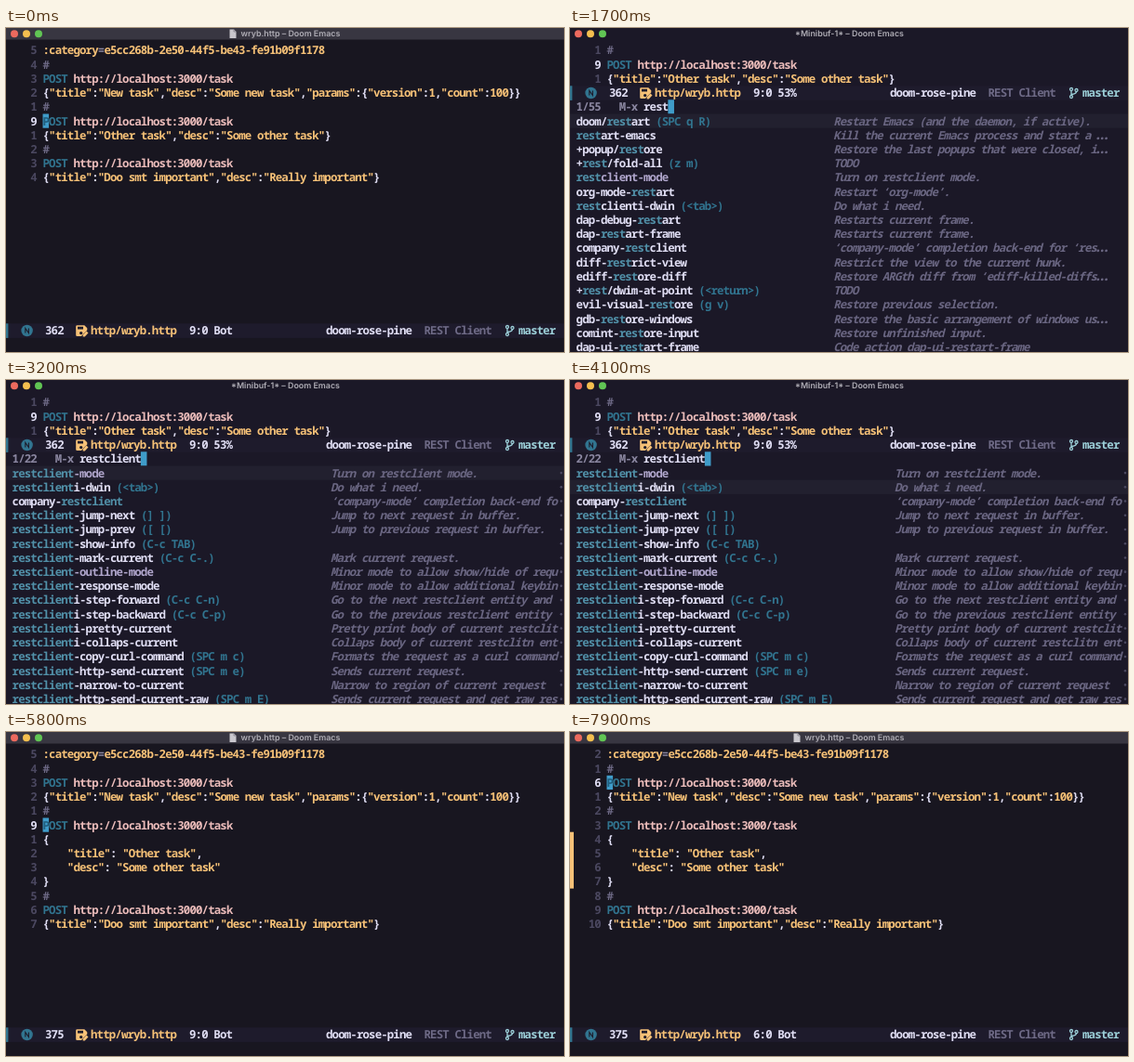
An HTML page for the animation above (8 s loop, 600 by 349 pixels).

```html
<!DOCTYPE html>
<html lang="en">
<head>
<meta charset="utf-8">
<title>Doom Emacs</title>
<style>
  html, body { margin: 0; height: 100%; overflow: hidden; background: #181620; }
  svg { display: block; width: 100vw; height: 100vh; }
  text {
    font: 600 12.4px "Noto Sans Mono", "DejaVu Sans Mono", monospace;
    letter-spacing: -0.855px;
    white-space: pre;
    text-rendering: geometricPrecision;
    fill: #e0def4;
  }
  .gold { fill: #f6c177; }
  .rose { fill: #ebbcba; }
  .pine { fill: #31748f; }
  .match { fill: #5190a8; }
  .foam { fill: #9ccfd8; }
  .muted { fill: #6e6a86; }
  .subtle { fill: #8a86a0; }
  .dim { fill: #4b4860; }
  .mode { fill: #afa5cb; }
  .note { fill: #6a6682; font-style: italic; }
  .under { fill: #205d7c; }
  .key { fill: #add8e6; }
  .b { font-weight: 700; }
  .dots { font: italic 600 16px "Noto Sans", sans-serif; letter-spacing: 0; }
  .title {
    font: 600 8.9px Inter, "Open Sans", sans-serif;
    letter-spacing: 0;
    text-anchor: middle;
    fill: #b0aeb6;
  }
</style>
</head>
<body>
<svg id="stage" viewBox="0 0 600 349" preserveAspectRatio="none"></svg>
<script>
const LOOP = 8000, CELL = 6.585, LINE = 15.22, LEFT = 6.6, TOP = 16.4;
const EDITOR_BG = '#181620', PALETTE_BG = '#1b1827';
const stage = document.getElementById('stage');

const colX = c => LEFT + c * CELL;
const rowY = r => TOP + r * LINE;
const esc = s => s.replace(/&/g, '&amp;').replace(/</g, '&lt;');
const text = (x, y, cls, s) =>
  `<text x="${x.toFixed(2)}" y="${y.toFixed(2)}" class="${cls}">${esc(s)}</text>`;
const rect = (x, y, w, h, fill) =>
  `<rect x="${x}" y="${y}" width="${w}" height="${h}" fill="${fill}"/>`;

// Puts [class, string] pieces one after another on the character grid.
function line(row, col, parts) {
  let out = '';
  for (const [cls, s] of parts) {
    if (s.trim()) out += text(colX(col), rowY(row) + 12, cls, s);
    col += s.length;
  }
  return out;
}

// ---- Buffer ----
const post = 'POST http://localhost:3000/task';
const head = [
  ':category=e5cc268b-2e50-44f5-be43-fe91b09f1178', '#', post,
  '{"title":"New task","desc":"Some new task","params":{"version":1,"count":100}}',
  '#', post
];
const tail = ['#', post, '{"title":"Doo smt important","desc":"Really important"}'];
const flat = [...head, '{"title":"Other task","desc":"Some other task"}', ...tail];
const pretty = [...head, '{', '    "title": "Other task",', '    "desc": "Some other task"', '}', ...tail];

function paint(s) {
  if (s === '#') return [['muted', s]];
  if (s[0] === ':') return [['gold b', s.slice(0, 9)], ['subtle', '='], ['gold', s.slice(10)]];
  if (s.startsWith('POST')) return [['pine b', 'POST'], ['rose', s.slice(4)]];
  return s.split(/("[^"]*"|\d+)/).map((p, i) => [i % 2 ? 'gold' : '', p]);
}

function buffer(lines, cur, from = 0, to = lines.length, block = true) {
  let out = '';
  for (let i = from; i < to; i++) {
    const here = i === cur, row = i - from;
    const num = String(here ? cur + 4 : Math.abs(i - cur));
    out += line(row, 4 - num.length, [[here ? '' : 'dim', num]]);
    out += line(row, 5, paint(lines[i]));
    if (here && block) {
      out += rect(colX(5), rowY(row), CELL, LINE, '#3f9cc9') + line(row, 5, [['under b', lines[i][0]]]);
    }
  }
  return out;
}

// ---- Window furniture ----
function titleBar(name, main) {
  const lights = ['#ec6a5e', '#f5bf4f', '#61c554']
    .map((c, i) => `<circle cx="${9 + 13 * i}" cy="6.2" r="4" fill="${c}"/>`).join('');
  const strip = main
    ? rect(0, 0, 600, 12.5, '#383641') +
      '<path d="M240.5 1.5h4.5l2.5 2.5v7h-7z" fill="#c9c7cd"/>' +
      '<path d="M245 1.5v2.5h2.5" fill="none" stroke="#77757e" stroke-width=".7"/>'
    : '';
  return strip + lights + text(main ? 306 : 300.5, 9.4, 'title', name + ' – Doom Emacs');
}

function modeLine(y, size, pos) {
  const put = (x, cls, s) => text(x, 4.4, cls, s);
  return `<g transform="translate(0 ${y})">` +
    rect(0, -7.7, 600, 15.6, '#1e1b2c') + rect(0, -7.7, 2.4, 15.6, '#31748f') +
    '<circle cx="22.6" cy="0" r="6.2" fill="#31748f"/>' +
    '<path d="M20.8 2.6v-5.2l3.6 5.2v-5.2" fill="none" stroke="#1d1b2a" stroke-width="1.1"/>' +
    put(42, '', size) +
    '<path d="M76.5-5.8h7.8l3 3v2.2l-6 6v.6h-4.8q-1.3 0-1.3-1.3v-9.2q0-1.3 1.3-1.3z" fill="#f6c177"/>' +
    '<path d="M77-4.2h6v2.6h-6zM79 2.6a1.7 1.7 0 1 1 3.4 0a1.7 1.7 0 1 1-3.4 0" fill="#1d1b2a"/>' +
    '<path d="M82.7 6.4v-2l3.8-3.8 2 2-3.8 3.8z" fill="#f6c177"/>' +
    put(91, 'gold b', 'http/wryb.http') + put(197, '', pos) +
    put(344, '', 'doom-rose-pine') + put(449.5, 'muted b', 'REST Client') +
    '<g fill="none" stroke="#9ccfd8" stroke-width="1.3"><path d="M539-2.5v5M544.5-1.5q0 2.5-5.5 3"/>' +
    '<circle cx="539" cy="-4" r="1.5"/><circle cx="539" cy="4" r="1.5"/><circle cx="544.5" cy="-3" r="1.5"/></g>' +
    put(551, 'foam b', 'master') + '</g>';
}

// ---- Completion lists: name|key|description, * marks an active mode ----
const parse = s => s.trim().split('\n').map(r => r.split('|'));

const allCommands = parse(`
my/set-transparent||Change current percentage of transparency.
scalai-sep-args||Transefer current def args to seporate line…
projectile-replace||Replace literal string in project using non…
regexp-builder||Construct a regexp interactively.
jira-from-org-kill||Convert org to jira format.
stevia-open-change-log-today||Open change log file by today’s date.
forge-browse||Visit the thing at point using a browser.
+magit/start-code-review||
magit-ediff-compare||Compare REVA:FILEA with REVB:FILEB using Ed…
eshell||Create an interactive Eshell buffer.
toggle-truncate-lines|C-x x t|Toggle truncating of long lines for the cur…
scratch-buffer||Switch to the *scratch* buffer.
+scala/open-repl||Open a scala repl. Uses ‘run-scala’ if in a…
scalai-concat-imports-region||Concat separeded imports to one in region.
dabbrev-completion|M-/|Completion on current word.
dabbrev-expand||Expand previous word "dynamically".
company-manual-begin||Start the completion interface.`);

const restCommands = parse(`
doom/restart|SPC q R|Restart Emacs (and the daemon, if active).
restart-emacs||Kill the current Emacs process and start a …
+popup/restore||Restore the last popups that were closed, i…
+rest/fold-all|z m|TODO
*restclient-mode||Turn on restclient mode.
org-mode-restart||Restart ‘org-mode’.
restclienti-dwin|<tab>|Do what i need.
dap-debug-restart||Restarts current frame.
dap-restart-frame||Restarts current frame.
company-restclient||‘company-mode’ completion back-end for ‘res…
diff-restrict-view||Restrict the view to the current hunk.
ediff-restore-diff||Restore ARGth diff from ‘ediff-killed-diffs…
+rest/dwim-at-point|<return>|TODO
evil-visual-restore|g v|Restore previous selection.
gdb-restore-windows||Restore the basic arrangement of windows us…
comint-restore-input||Restore unfinished input.
dap-ui-restart-frame||Code action dap-ui-restart-frame`);

const clientCommands = parse(`
*restclient-mode||Turn on restclient mode.
restclienti-dwin|<tab>|Do what i need.
company-restclient||‘company-mode’ completion back-end fo
restclient-jump-next|] ]|Jump to next request in buffer.
restclient-jump-prev|[ [|Jump to previous request in buffer.
restclient-show-info|C-c TAB|
restclient-mark-current|C-c C-.|Mark current request.
*restclient-outline-mode||Minor mode to allow show/hide of requ
restclient-response-mode||Minor mode to allow additional keybin
restclienti-step-forward|C-c C-n|Go to the next restclient entity and
restclienti-step-backward|C-c C-p|Go to the previous restclient entity
restclienti-pretty-current||Pretty print body of current restclit
restclienti-collaps-current||Collaps body of current restclitn ent
restclient-copy-curl-command|SPC m c|Formats the request as a curl command
restclient-http-send-current|SPC m e|Sends current request.
restclient-narrow-to-current||Narrow to region of current request
restclient-http-send-current-raw|SPC m E|Sends current request and get raw res`);

function candidate([raw, key, note], row, query, wide) {
  const active = raw[0] === '*', name = active ? raw.slice(1) : raw;
  const base = active ? 'mode b' : '';
  const at = query.length > 1 ? name.indexOf(query) : -1;
  const end = at + query.length;
  const parts = at < 0 ? [[base, name]]
    : [[base, name.slice(0, at)], ['match', query], [base, name.slice(end)]];
  if (key) parts.push(['pine', ` (${key})`]);
  const cut = note.endsWith('…'), body = cut ? note.slice(0, -1) : note;
  const overflow = wide ? `<circle cx="597" cy="${rowY(row) + LINE / 2}" r="1.3" fill="#4b4860"/>` : '';
  return line(row, 0, parts) + overflow +
    line(row, wide ? 52 : 42, [['note', body], ['note dots', cut ? '…' : '']]);
}

function palette(query, pick) {
  const n = query.length;
  const list = n < 2 ? allCommands : n < 5 ? restCommands : clientCommands;
  const total = n < 2 ? 10345 : n === 2 ? 1204 : n === 3 ? 231 : n === 4 ? 55 : 22;
  const prompt = `${pick + 1}/${total}`.padEnd(6) + ' M-x ';
  return rect(0, 0, 600, 349, PALETTE_BG) +
    titleBar('*Minibuf-1*', false) +
    buffer(flat, 5, 4, 7, false) +
    modeLine(70, '362', '9:0 53%') +
    line(4, 0, [['subtle', prompt], ['', query]]) +
    rect(colX(prompt.length + n), rowY(4), CELL, LINE, '#3f9cc9') +
    rect(0, rowY(5 + pick), 600, LINE, '#22202f') +
    list.map((c, i) => candidate(c, 5 + i, query, n > 4)).join('');
}

function echo() {
  const msg = 'You can run the command ‘restclienti-dwin’ with ', x = colX(msg.length);
  return text(LEFT, 346, '', msg) +
    `<rect x="${x - 0.5}" y="334.5" width="${CELL * 5 + 1}" height="14" fill="#303030" stroke="#595959"/>` +
    text(x, 346, 'key', '<tab>');
}

function editor(done, cur, message, gutter) {
  return rect(0, 0, 600, 349, EDITOR_BG) +
    titleBar('wryb.http', true) +
    buffer(done ? pretty : flat, cur) +
    (gutter ? rect(0, rowY(6), 4, LINE * 4, '#f6c177') : '') +
    modeLine(326, done ? '375' : '362', `${cur + 4}:0 Bot`) +
    (message ? echo() : '');
}

// ---- Timeline ----
const OPEN = 600, ENTER = 4400;
const keyTimes = [1200, 1400, 1500, 1600, 2200, 2300, 2400, 2500, 2600, 2700];
const moves = [7200, 7500, 7800];
const passed = (times, t) => times.filter(at => t >= at).length;

function scene(t) {
  if (t >= OPEN && t < ENTER) {
    return [palette, 'restclient'.slice(0, passed(keyTimes, t)), t >= 3700 ? 1 : 0];
  }
  return [editor, t >= ENTER, 5 - passed(moves, t), t >= 4500 && t < 5600, t >= 6400];
}

let shown = '';
function frame() {
  const [draw, ...args] = scene(performance.now() % LOOP);
  const id = draw.name + args;
  if (id !== shown) {
    stage.innerHTML = draw(...args);
    shown = id;
  }
  requestAnimationFrame(frame);
}
frame();
</script>
</body>
</html>
```
